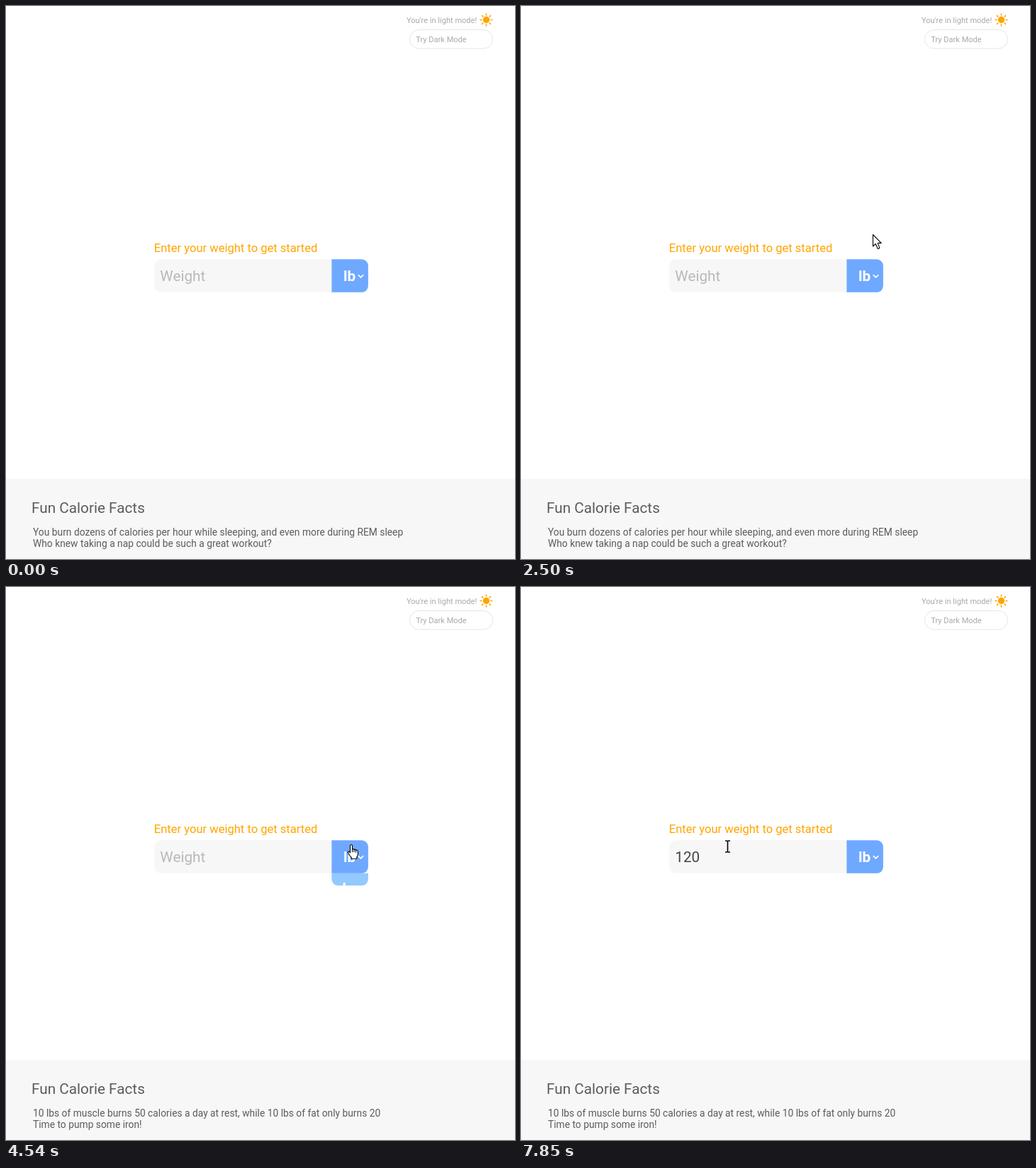
Animation, 718 px wide and 780 px high, one loop 8 s. Source, as an HTML page with a canvas:

```html
<!DOCTYPE html>
<html lang="en">
<head>
<meta charset="utf-8">
<title>Calorie calculator</title>
<style>
  html, body { margin: 0; width: 100%; height: 100%; overflow: hidden; background: #fff; }
  canvas { display: block; }
</style>
</head>
<body>
<canvas id="stage" width="718" height="780"></canvas>
<script>
const ctx = document.getElementById('stage').getContext('2d');
const LOOP = 8000;
const BLUE = '#6fa8ff', PALE_BLUE = '#92c9ff', ORANGE = '#ffa500', PANEL = '#f7f7f7';
const BUTTON = { x: 459.4, y: 357.3, w: 51.5, h: 46.5 };
const INPUT = { x: 209.3, y: 357.3, w: 250.1, h: 46.5 };
const MENU_H = 43;
const SMALL = 11.06, BODY = 13.82, LABEL = 16.56, LARGE = 20.74;

const FACTS = [
  ['You burn dozens of calories per hour while sleeping, and even more during REM sleep',
   'Who knew taking a nap could be such a great workout?'],
  ['10 lbs of muscle burns 50 calories a day at rest, while 10 lbs of fat only burns 20',
   'Time to pump some iron!']
];

// turning points of the pointer: time, x, y
const PATH = [
  [380, 600, 776], [520, 627, 640], [850, 440, 296], [1000, 347, 380], [1260, 405, 544],
  [1360, 438, 480], [1650, 280, 182], [1865, 63, 290], [1910, 95, 345], [2170, 350, 682],
  [2390, 537, 480], [2590, 450, 248], [2830, 380, 400], [3060, 436, 457], [3640, 471, 358],
  [3800, 472, 373], [4100, 503, 384], [4310, 487, 363], [4960, 487, 363], [5000, 493, 363],
  [5180, 493, 363], [5260, 493, 373], [5330, 493, 373], [5980, 291.5, 372],
  [6150, 291.5, 372], [6320, 291.5, 365.5]
];

const clamp = v => Math.max(0, Math.min(1, v));
const smooth = p => p * p * (3 - 2 * p);

// close to the CSS "ease" curve
const ease = p => 1 - Math.pow(1 - smooth(Math.pow(p, 0.75)), 1.35);

// tangent that never overshoots a turning point
function slope(i, k) {
  if (i < 1 || i > PATH.length - 2) return 0;
  const rate = j => (PATH[j + 1][k] - PATH[j][k]) / (PATH[j + 1][0] - PATH[j][0]);
  const a = rate(i - 1), b = rate(i);
  return a * b <= 0 ? 0 : 2 * a * b / (a + b);
}

function pointerAt(t) {
  let i = 0;
  while (i < PATH.length - 2 && PATH[i + 1][0] <= t) i++;
  const a = PATH[i], b = PATH[i + 1], d = b[0] - a[0];
  const u = clamp((t - a[0]) / d), v = 1 - u;
  return [1, 2].map(k =>
    a[k] * smooth(v) + b[k] * smooth(u) +
    d * u * v * (slope(i, k) * v - slope(i + 1, k) * u));
}

function text(str, x, y, size, color, weight = 400) {
  ctx.font = `${weight} ${size}px Roboto, sans-serif`;
  ctx.fillStyle = color;
  ctx.fillText(str, x, y);
}

function box(r, radii, color) {
  ctx.beginPath();
  ctx.roundRect(r.x, r.y, r.w, r.h, radii);
  ctx.fillStyle = color;
  ctx.fill();
}

function line(points, color, width) {
  ctx.beginPath();
  points.forEach(p => ctx.lineTo(p[0], p[1]));
  ctx.strokeStyle = color;
  ctx.lineWidth = width;
  ctx.stroke();
}

function sun(x, y) {
  ctx.beginPath();
  ctx.arc(x, y, 4.7, 0, 7);
  ctx.fillStyle = ORANGE;
  ctx.fill();
  for (let i = 0; i < 8; i++) {
    const c = Math.cos(i * Math.PI / 4), s = Math.sin(i * Math.PI / 4);
    line([[x + 6.6 * c, y + 6.6 * s], [x + 8.4 * c, y + 8.4 * s]], ORANGE, 1.6);
  }
}

function header() {
  text("You're in light mode!", 565, 24, SMALL, '#a9a9a9');
  sun(677.5, 19.5);
  ctx.beginPath();
  ctx.roundRect(569.5, 33.5, 117, 26.5, 13);
  ctx.strokeStyle = '#e6e6e6';
  ctx.lineWidth = 1;
  ctx.stroke();
  text('Try Dark Mode', 578.3, 51, SMALL, '#a9a9a9');
}

function footer(t) {
  ctx.fillStyle = PANEL;
  ctx.fillRect(0, 667, 718, 113);
  text('Fun Calorie Facts', 36, 715, LARGE, '#5c5c5c');
  FACTS[t < 3300 ? 0 : 1].forEach((s, i) => text(s, 38, 747 + 16 * i, BODY, '#5c5c5c'));
}

function menu(t) {
  const h = MENU_H * (ease(clamp((t - 4460) / 300)) - ease(clamp((t - 5170) / 300)));
  if (h < 0.5) return;
  const r = { x: BUTTON.x, y: BUTTON.y + BUTTON.h, w: BUTTON.w, h };
  const round = Math.min(9, h);
  ctx.save();
  box(r, [0, 0, round, round], PALE_BLUE);
  ctx.clip();
  text('kg', 474.5, 432, LARGE, '#fff', 700);
  ctx.restore();
}

function typed(t) {
  return '120'.slice(0, [7340, 7470, 7750].filter(at => t >= at).length);
}

function caretOn(t) {
  if (t < 5830 || t >= 7850) return false;
  return t >= 7340 || (t - 5830) % 950 < 480;
}

function form(t) {
  text('Enter your weight to get started', 208.8, 347, LABEL, ORANGE);
  box(INPUT, [9, 0, 0, 9], PANEL);
  const value = typed(t);
  text(value || 'Weight', 217.3, 388, LARGE, value ? '#444' : '#b9b9b9');
  if (caretOn(t)) {
    const x = 217 + (value ? Math.round(ctx.measureText(value).width) : 0);
    ctx.fillStyle = '#444';
    ctx.fillRect(x, 368, 1, 25);
  }
  menu(t);
  box(BUTTON, [0, 9, 9, 0], BLUE);
  text('lb', 475.9, 388, LARGE, '#fff', 700);
  line([[497.3, 379.7], [500.5, 382.8], [503.7, 379.7]], '#fff', 1.7);
}

function outlined(d, details = '') {
  const p = new Path2D(d);
  ctx.fillStyle = '#fff';
  ctx.fill(p);
  ctx.strokeStyle = '#000';
  ctx.lineWidth = 1.1;
  ctx.stroke(p);
  ctx.stroke(new Path2D(details));
}

const cursors = {
  arrow() {
    outlined('M.5 .5V17L4.3 13.5L7.2 20.2Q8.6 20.8 9.9 19.1L7.2 12.4H12.2Z');
  },
  hand() {
    outlined('M-1.5 11V2Q-1.5 .5 0 .5T1.5 2V7Q3 5.8 4 7.4Q5.7 6.6 6.6 8.2Q9.4 7.6 9.4 10.2V14' +
      'Q9.2 16.5 7.8 18V20.3H.3V18.6Q-2 16.5-4.2 12.6Q-5.3 10.6-4 10.1Q-2.8 9.8-1.5 12Z',
      'M1.5 7V10.5M4 7.4V10.8M6.6 8.2V11.2');
  },
  beam() {
    line([[0, -7.5], [0, 7.5]], '#000', 1.6);
    for (const y of [-8, 8]) line([[-3, y], [-1, y], [0, y * 0.9], [1, y], [3, y]], '#000', 1.3);
  }
};

function inside(r, x, y) {
  return x >= r.x && x < r.x + r.w && y >= r.y && y < r.y + r.h;
}

function pointer(t) {
  if (t < PATH[0][0]) return;
  const [x, y] = pointerAt(t);
  const kind = inside(BUTTON, x, y) ? 'hand' : inside(INPUT, x, y) ? 'beam' : 'arrow';
  ctx.save();
  ctx.translate(kind === 'beam' ? Math.floor(x) + 0.5 : Math.round(x), Math.round(y));
  cursors[kind]();
  ctx.restore();
}

function draw(now) {
  const t = now % LOOP;
  ctx.fillStyle = '#fff';
  ctx.fillRect(0, 0, 718, 780);
  ctx.lineCap = ctx.lineJoin = 'round';
  header();
  form(t);
  footer(t);
  pointer(t);
}

const start = performance.now();
function tick() {
  draw(performance.now() - start);
  requestAnimationFrame(tick);
}
tick();
</script>
</body>
</html>
```
